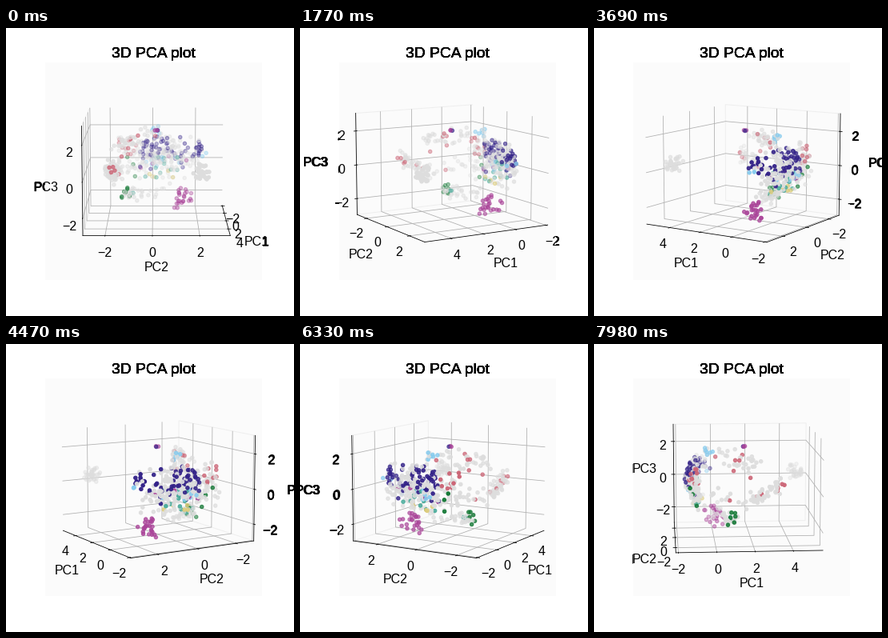
A matplotlib script for the animation above (8000 ms loop, 360x360 px).

```python
import numpy as np
import matplotlib.pyplot as plt
from matplotlib.animation import FuncAnimation
from matplotlib.patheffects import withStroke

LOOP_MS = 8000
FRAMES = 267          # one degree per frame
ELEV = 10

PALETTE = {"indigo": "#332288", "cyan": "#88CCEE", "teal": "#44AA99",
           "green": "#117733", "sand": "#DDCC77", "rose": "#CC6677",
           "purple": "#AA4499", "grey": "#DDDDDD"}

# Axis limits: middle and span of PC1, PC2, PC3
MID = np.array([1.71, 0.175, 0.04])
SPAN = np.array([7.68, 6.23, 6.0])
BOX = np.array([1.19, 1.19, 0.893])

plt.rcParams.update({"font.family": "Liberation Sans", "font.size": 16})
rng = np.random.default_rng(12)


def noise(n, size):
    return np.clip(rng.normal(size=n), -1.9, 1.9) * size


def tint(names, share, n):
    """Grey, with a share of the points in one of the named colours."""
    picks = rng.choice(names.split(), n)
    return list(np.where(rng.random(n) < share, picks, "grey"))


def sheet_color(y, z):
    """Colour of a point by its region on the curved sheet."""
    if z > 0.03:
        names, share = ("rose", 0.4) if y < -0.18 else ("indigo", 0.42)
    elif y < -0.17:
        names, share = "green", 0.3
    elif z < -0.08:
        names, share = "sand teal", 0.35
    else:
        names, share = "purple cyan teal indigo", 0.25
    return tint(names, share, 1)[0]


def sheet(n):
    """Curved sheet that bends towards larger PC1 at its rims."""
    y = 0.02 + noise(n, 0.185)
    z = 0.03 + noise(n, 0.095)
    x = -0.46 + 1.6 * (z - 0.04) ** 2 + 0.35 * y ** 2 + noise(n, 0.025)
    names = [sheet_color(*p) for p in zip(y, z)]
    return np.column_stack([x, y, z]), names


def streak(start, end, n, width, names, share):
    t = rng.random((n, 1))
    a, b = np.array(start), np.array(end)
    return a + (b - a) * t + noise((n, 3), width), tint(names, share, n)


# Key points of the cloud, in box coordinates
far = 0.47, 0.36, 0.05
arm = 0.30, -0.38, 0.07
elbow = 0.03, -0.36, -0.08
side = -0.32, -0.28, -0.03
upper = 0.02, -0.27, 0.22
cap = -0.31, 0.0, 0.29
crown = 0.0, 0.0, 0.325
heel = -0.12, -0.26, -0.25
base = -0.26, 0.08, -0.24
foot = -0.26, 0.21, -0.30
edge = -0.34, 0.37, 0.09

parts = [
    sheet(290),
    streak(far, far, 34, 0.035, "cyan", 0.04),
    streak(arm, elbow, 44, 0.032, "rose", 0.2),
    streak(elbow, side, 16, 0.035, "rose", 0.1),
    streak(upper, upper, 18, 0.06, "rose", 0.1),
    streak(upper, cap, 18, 0.045, "rose", 0.15),
    streak(cap, cap, 9, 0.02, "cyan", 0.6),
    streak(crown, crown, 3, 0.008, "indigo purple", 1),
    streak(heel, heel, 14, 0.03, "green", 0.6),
    streak(heel, base, 26, 0.035, "teal", 0.12),
    streak(foot, foot, 24, 0.05, "purple", 1),
    streak(edge, edge, 8, 0.035, "indigo cyan", 0.6),
]
data = MID + np.vstack([p for p, _ in parts]) * SPAN / BOX
colors = [PALETTE[name] for _, names in parts for name in names]


def make_axes(fig):
    ax = fig.add_axes([0.125, 0.125, 0.775, 0.755], projection="3d")
    axes = ax.xaxis, ax.yaxis, ax.zaxis
    limits = ax.set_xlim, ax.set_ylim, ax.set_zlim
    for k, (axis, set_lim) in enumerate(zip(axes, limits)):
        set_lim(MID[k] - SPAN[k] / 2, MID[k] + SPAN[k] / 2)
        axis.set_ticks(range(-2, 5 if k == 0 else 3, 2))
        axis.set_label_text(f"PC{k + 1}")
        axis.labelpad = 10.5
        axis.pane.set_visible(axis is ax.yaxis)
    ax.yaxis.pane.set_fill(False)
    ax.yaxis.pane.set_edgecolor("#e2e2e2")
    return ax


fig = plt.figure(figsize=(5, 5), dpi=72, facecolor="white")

# The lower axes thicken the lettering outside the grey panel
under = make_axes(fig)
under.grid(False)
under.patch.set_visible(False)
for axis in (under.xaxis, under.yaxis, under.zaxis):
    for text in [axis.label, *axis.get_ticklabels()]:
        text.set_path_effects([withStroke(linewidth=0.6, foreground="black")])

ax = make_axes(fig)
ax.patch.set_facecolor("#fbfbfb")
ax.scatter(*data.T, c=colors, s=20)

# Repeated drawing gives the heavy edges of the title
for _ in range(7):
    fig.text(0.5125, 1 - 37.2 / 360, "3D PCA plot", fontsize=19.2,
             ha="center", va="baseline")


def update(i):
    for a in (under, ax):
        a.view_init(elev=ELEV, azim=i + 0.01)
    return []


anim = FuncAnimation(fig, update, frames=FRAMES, interval=LOOP_MS / FRAMES,
                     init_func=lambda: update(0), repeat=True,
                     cache_frame_data=False)
plt.show()
```
